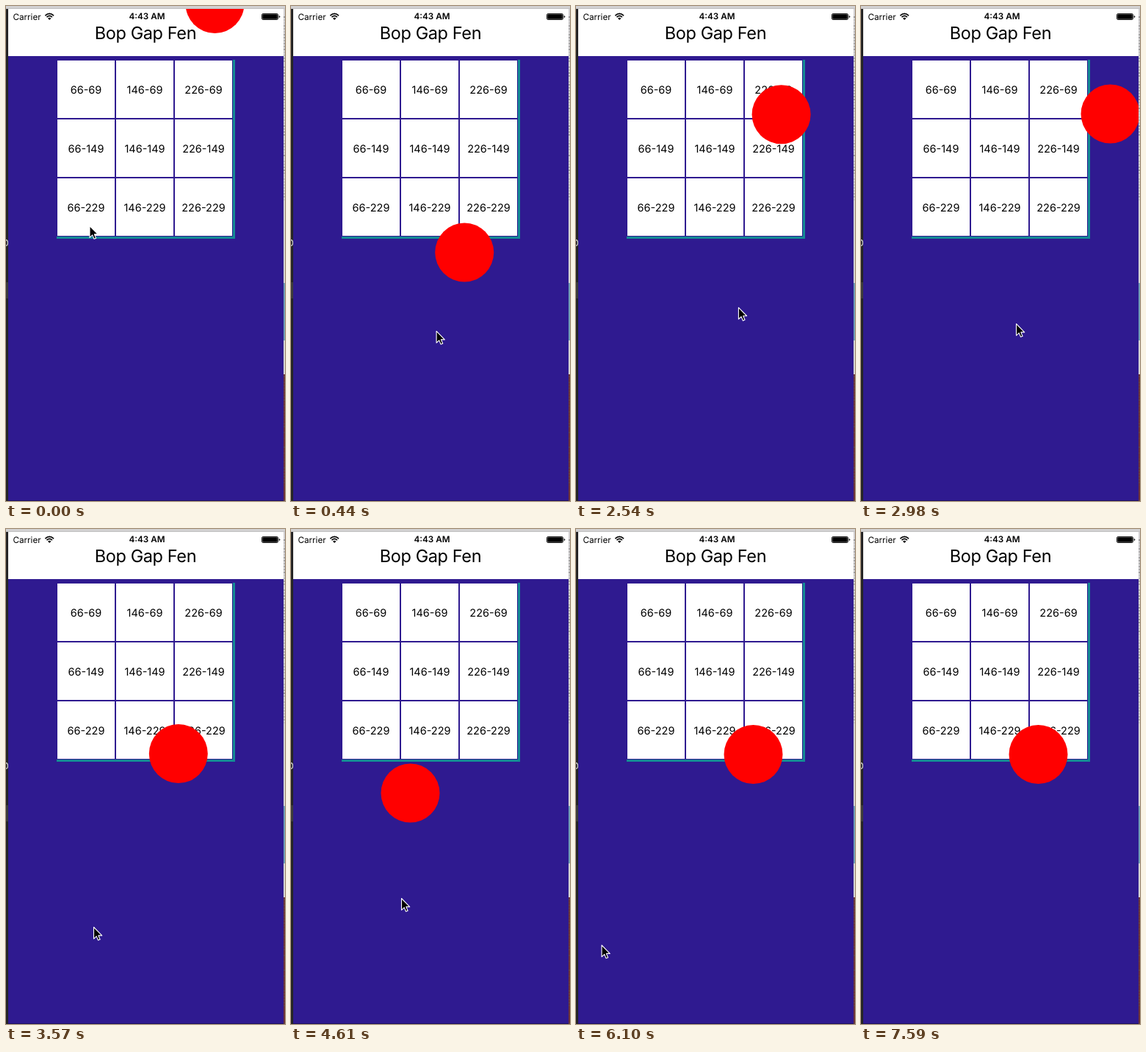
These frames come from a looping animation (380x672 px, 7690 ms). An HTML page:

```html
<!DOCTYPE html>
<html lang="en">
<head>
<meta charset="utf-8">
<title>Ball flick</title>
<style>
html, body { margin: 0; width: 100%; height: 100%; overflow: hidden; background: #2f1a90; }
svg { display: block; }
text { font-family: Inter, Roboto, sans-serif; text-anchor: middle; text-rendering: geometricPrecision; }
.cell { font-size: 14.5px; }
.title { font-size: 23.5px; letter-spacing: -.4px; }
.bar { font-size: 11.7px; }
</style>
</head>
<body>
<svg width="380" height="672" viewBox="0 0 380 672">
  <defs>
    <clipPath id="screen"><path d="M3 4H378V672H3Z"/></clipPath>
  </defs>

  <!-- desktop behind the simulator -->
  <rect width="380" height="672" fill="#d2d1d2"/>
  <path d="M0 3.5H380" stroke="#c2c1c2"/>
  <path d="M0 4H3V672H0Z" fill="#252425"/>
  <path d="M0 375H3V397H0Z" fill="#3b3a3b"/>
  <path d="M0 317.5Q2.5 318 2.5 321.5T0 325.5" fill="none" stroke="#c8c8c8" stroke-width="1.3"/>
  <path d="M378 376H380V454H378Z" fill="#6f9bb4"/>
  <path d="M378 500H380V672H378Z" fill="#6b3038"/>
  <g id="specks" fill="#555"></g>

  <g clip-path="url(#screen)">
    <path d="M3 4H378V672H3Z" fill="#2f1a90"/>
    <path d="M3 4H378V68H3Z" fill="#fff"/>
    <path d="M69 73H312V316H69Z" fill="#148a94"/>
    <g id="grid" fill="#fff" stroke="#2f1a90"></g>
    <g id="labels"></g>
    <text class="title" x="190" y="45">Bop Gap Fen</text>
    <path d="M3 671.5H378" stroke="#1d1160"/>
    <circle id="ball" r="40" fill="#f00"/>

    <text class="bar" x="28.5" y="18.5">Carrier</text>
    <text class="bar" x="192" y="18.3" font-weight="600">4:43 AM</text>
    <path d="M53.4 13.1Q59.2 7.7 65 13.1M55.5 15.2Q59.2 11.7 62.9 15.2" fill="none" stroke="#000" stroke-width="1.7"/>
    <path d="M57 16.7Q59.2 14.8 61.4 16.7L59.2 19Z"/>
    <rect x="348.5" y="10.5" width="22" height="8" rx="1.6" fill="none" stroke="#000" stroke-width=".9"/>
    <rect x="349.3" y="11.3" width="20.4" height="6.4" rx=".7"/>
    <path d="M371.8 13Q373.3 13.2 373.3 14.5T371.8 16Z"/>
  </g>

  <path id="cursor" d="M0 0V15.8L3.7 12.4 6 17.8 8.6 16.7 6.3 11.4H11.2Z" stroke="#fff" stroke-width="1.1" stroke-linejoin="round"/>
</svg>
<script>
const LOOP = 7690, TICK = 148.82, HIDE = 48;
const $ = id => document.getElementById(id);

// Each move: start tick, end tick, target point, sideways bend of the path.
const ball = {
  el: $('ball'), home: [284.5, -3],
  moves: [
    [0, 4, 233, 357, 0, 0],
    [16, 20, 339.5, 146.5, 0, -120],
    [20, 22, 234.8, 305, 0, 0],
    [24, 29, 162.5, 358.5, 0, -70],
    [34, 38, 346.5, 225.5, 0, -160],
    [38, 41, 241.5, 306, 0, 0]
  ]
};
const cursor = {
  el: $('cursor'), home: [114, 298.5],
  moves: [
    [0, 4, 224.5, 386.5, -100, 310],
    [10, 14, 239, 370, 19, -27],
    [15, 20, 211.5, 431.5, 0, 0],
    [20, 22, 119.5, 578, 0, 0],
    [23, 24, 119.5, 540.5, 0, 0],
    [24, 31, 150.5, 501.5, -88, 98],
    [31, 38, 134.5, 503.5, 20, -40],
    [38, 41, 35, 565, 0, 20],
    [43, 45, 295, 659, 0, 0],
    [46, 47, 331, 661, 0, 0]
  ]
};

const easeOut = k => 1 - (1 - k) ** 2;

function place({ el, home: [x, y], moves }, tick) {
  for (const [from, to, tx, ty, bendX, bendY] of moves) {
    if (tick < from) break;
    const k = easeOut(Math.min(1, (tick - from) / (to - from)));
    const bend = Math.sin(Math.PI * k);
    x += (tx - x) * k + bendX * bend;
    y += (ty - y) * k + bendY * bend;
  }
  el.setAttribute('transform', `translate(${x} ${y})`);
}

function drawGrid() {
  let cells = '', labels = '';
  for (let i = 0; i < 9; i++) {
    const x = 66 + i % 3 * 80, y = 69 + Math.floor(i / 3) * 80;
    cells += `<rect x="${x + 3.5}" y="${y + 4.5}" width="79" height="79"/>`;
    labels += `<text class="cell" x="${x + 43}" y="${y + 49.5}">${x}-${y}</text>`;
  }
  $('grid').innerHTML = cells;
  $('labels').innerHTML = labels;
}

// slivers of text showing at the right edge of the window
function drawSpecks() {
  let seed = 7, specks = '';
  const random = () => (seed = seed * 16807 % 2147483647) / 2147483647;
  for (let y = 10; y < 672; y += 4) {
    if (y > 265 && y < 500) continue;
    specks += `<rect x="378" y="${y}" width="2" height="2" opacity="${random() * .5}"/>`;
  }
  $('specks').innerHTML = specks;
}

const start = performance.now();
function draw() {
  // the picture only refreshes once per tick
  const tick = Math.floor(((performance.now() - start) % LOOP + 6) / TICK);
  place(ball, tick);
  place(cursor, tick);
  cursor.el.style.display = tick < HIDE ? '' : 'none';
  requestAnimationFrame(draw);
}

drawGrid();
drawSpecks();
draw();
</script>
</body>
</html>
```
